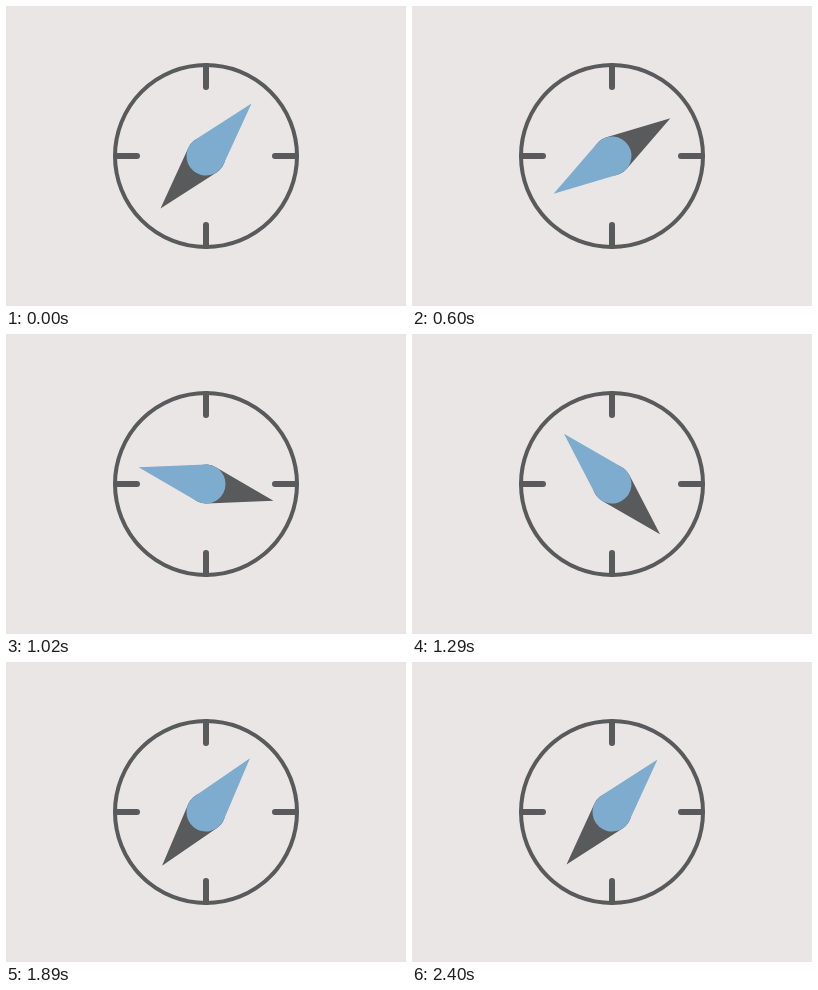
An HTML page that plays this animation: 400x300 px, repeating every 3600 ms.

```html
<!DOCTYPE html>
<html lang="en">
<head>
<meta charset="utf-8">
<title>Compass</title>
<style>
  html, body { margin: 0; height: 100%; overflow: hidden; background: #eae6e5; }
  svg { display: block; width: 100vw; height: 100vh; }
  .dial { fill: none; stroke: #595a5c; }
</style>
</head>
<body>
<svg viewBox="0 0 400 300">
  <defs>
    <path id="hand" d="M0-69.5L18.7-5.5A19.5 19.5 0 1 1-18.7-5.5Z"/>
    <path id="ticks" d="M0-90V-69M0 90V69M-90 0H-69M90 0H69"/>
  </defs>
  <g transform="translate(200 150)">
    <circle class="dial" r="91" stroke-width="4"/>
    <use href="#ticks" class="dial" stroke-width="6" stroke-linecap="round"/>
    <g id="needle">
      <use href="#hand" fill="#595a5c" transform="rotate(180)"/>
      <use href="#hand" fill="#7eacce"/>
    </g>
  </g>
</svg>
<script>
  const STEP = 30, LOOP = 3600, REST = 40.9;
  const needle = document.getElementById('needle');

  // Swing keys: step, offset from rest in degrees, easing handles toward the next key
  const keys = [
    { at: 15, angle: 0, ease: [0.3, 0.56] },
    { at: 35, angle: -840.5 },
    { at: 60.3, angle: -689 },
    { at: 65, angle: -742.5 },
    { at: 70, angle: -705 },
    { at: 80, angle: -720 }
  ];

  // Cubic Bezier (x1, 0, x2, 1), solved by bisection
  function bezier(p, [x1, x2]) {
    let lo = 0, hi = 1, s;
    for (let i = 0; i < 24; i++) {
      s = (lo + hi) / 2;
      const x = 3 * (1 - s) * s * ((1 - s) * x1 + s * x2) + s ** 3;
      if (x < p) lo = s; else hi = s;
    }
    return s * s * (3 - 2 * s);
  }

  function offset(step) {
    if (step <= keys[0].at) return 0;
    const i = keys.findIndex(key => key.at > step);
    if (i < 0) return 0;
    const a = keys[i - 1], b = keys[i];
    const p = (step - a.at) / (b.at - a.at);
    return a.angle + (b.angle - a.angle) * bezier(p, a.ease || [1 / 3, 2 / 3]);
  }

  function draw() {
    const step = Math.floor(performance.now() % LOOP / STEP);
    needle.setAttribute('transform', `rotate(${REST + offset(step)})`);
    requestAnimationFrame(draw);
  }
  draw();
</script>
</body>
</html>
```
